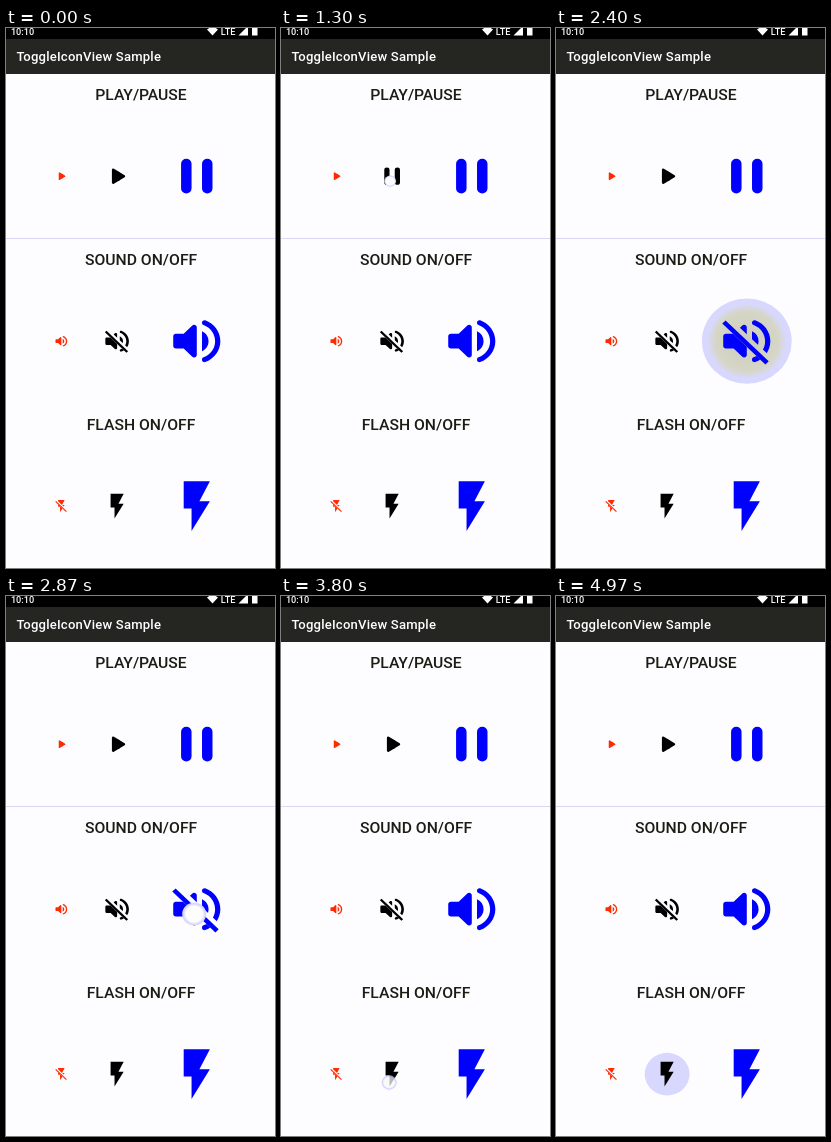
These frames come from a looping animation (269 px wide and 540 px high, 5.03 s). An HTML page with a canvas:

```html
<!DOCTYPE html>
<html>
<head>
<meta charset="utf-8">
<title>ToggleIconView Sample</title>
<style>
html, body { margin: 0; width: 100%; height: 100%; overflow: hidden; background: #fdfdff; }
canvas { display: block; }
</style>
</head>
<body>
<canvas id="stage" width="269" height="540"></canvas>
<script>
const ctx = document.getElementById('stage').getContext('2d');
const LOOP = 5030;
// One layout unit (dp) in pixels; the screen is slightly squashed.
const SX = 0.6545, SY = 0.62;
const COLS = [
  { x: 84.6, size: 24, color: '#ff2a00' },
  { x: 169.8, size: 48, color: '#000' },
  { x: 291.5, size: 96, color: '#00f' }
];
const ROWS = [
  { y: 239, label: 'PLAY/PAUSE', draw: drawPlay, on: [0, 0, 1] },
  { y: 505.1, label: 'SOUND ON/OFF', draw: drawSound, on: [1, 0, 1] },
  { y: 771.2, label: 'FLASH ON/OFF', draw: drawFlash, on: [0, 1, 1] }
];
// dx, dy: touch point relative to the icon centre
const TAPS = [
  { t: 430, row: 0, col: 1, dx: -3, dy: 8 },
  { t: 1300, row: 0, col: 1, dx: -3, dy: 8 },
  { t: 2020, row: 1, col: 2, dx: -4, dy: 8 },
  { t: 2850, row: 1, col: 2, dx: -4, dy: 8 },
  { t: 3730, row: 2, col: 1, dx: -5, dy: 15 },
  { t: 4400, row: 2, col: 1, dx: -5, dy: 15 }
];
const SPEAKER = new Path2D('M3 10v4c0 .55.45 1 1 1h3l3.29 3.29c.63.63 1.71.18 1.71-.71V6.41c0-.89-1.08-1.34-1.71-.71L7 9H4c-.55 0-1 .45-1 1z' +
  'M16.5 12A4.5 4.5 0 0 0 14 7.97v8.05c1.48-.73 2.5-2.25 2.5-4.02z' +
  'M14 4.45v.2c0 .38.25.71.6.85C17.18 6.53 19 9.06 19 12s-1.82 5.47-4.4 6.5c-.36.14-.6.47-.6.85v.2c0 .63.63 1.07 1.21.85C18.6 19.11 21 15.84 21 12s-2.4-7.11-5.79-8.4c-.58-.23-1.21.22-1.21.85z');
const BOLT = new Path2D('M7 2v11h3v9l7-12h-4l4-8z');
const LEFT = [9, 6.8, 13.1, 9.4, 13.1, 14.6, 9, 17.2];
const RIGHT = [13.1, 9.4, 17.2, 12, 17.2, 12, 13.1, 14.6];
const BAR_Y = [7, 7, 17, 17];
const WHITE = [253, 253, 253], LAVENDER = [216, 216, 255];

const clamp = v => Math.max(0, Math.min(1, v));
const lerp = (a, b, p) => a + (b - a) * p;
const ease = p => { p = clamp(p); return p * p * (3 - 2 * p); };
const mix = (a, b, p) => a.map((v, i) => lerp(v, b[i], p));
const rgb = c => `rgb(${c.map(Math.round)})`;

function drawPlay(on) {
  ctx.lineJoin = ctx.lineCap = 'round';
  ctx.lineWidth = lerp(2, 4, on);
  [[LEFT, 8], [RIGHT, 16]].forEach(([quad, barX]) => {
    ctx.beginPath();
    BAR_Y.forEach((y, i) =>
      ctx.lineTo(lerp(quad[2 * i], barX, on), lerp(quad[2 * i + 1], y, on)));
    ctx.closePath();
    ctx.fill();
    ctx.stroke();
  });
}

// Icon crossed out by a growing slash with a gap along its upper side
function drawSlashed(shape, on) {
  const off = 1 - on, len = 16.47 * off, cut = 17.73 * off;
  ctx.save();
  if (off > 0) {
    const gap = new Path2D('M-9-9H33V33H-9z');
    gap.moveTo(2, 4.27);
    gap.lineTo(4.54, 1.73);
    gap.lineTo(4.54 + cut, 1.73 + cut);
    gap.lineTo(2 + cut, 4.27 + cut);
    gap.closePath();
    ctx.clip(gap, 'evenodd');
  }
  ctx.fill(shape);
  ctx.restore();
  if (off > 0) {
    ctx.lineCap = 'butt';
    ctx.lineWidth = 1.8;
    ctx.beginPath();
    ctx.moveTo(3.27, 4.27);
    ctx.lineTo(3.27 + len, 4.27 + len);
    ctx.stroke();
  }
}
function drawSound(on) { drawSlashed(SPEAKER, on); }
function drawFlash(on) { drawSlashed(BOLT, on); }

function iconState(row, col, t) {
  let on = ROWS[row].on[col];
  for (const tap of TAPS) {
    if (tap.row !== row || tap.col !== col) continue;
    on = lerp(on, 1 - on, ease((t - tap.t - 90) / 250));
  }
  return on;
}

function drawRipple(tap, t, over) {
  const age = t - tap.t;
  if (age < 0 || age > 800) return;
  const alpha = over ? clamp(1.4 * (1 - age / 150)) : clamp((800 - age) / 200);
  if (!alpha) return;
  const { x, size } = COLS[tap.col], y = ROWS[tap.row].y;
  const grow = ease(age / 360);
  const r = size * 0.715 * lerp(0.26, 1, grow);
  const tint = c => rgb(mix(mix(WHITE, c, clamp((age - 60) / 140)), LAVENDER, clamp((age - 450) / 100)));
  ctx.save();
  ctx.globalAlpha = alpha;
  ctx.translate(x + tap.dx * (1 - grow), y + tap.dy * (1 - grow));
  const fill = ctx.createRadialGradient(0, 0, 0, 0, 0, r);
  fill.addColorStop(0, tint([204, 204, 190]));
  fill.addColorStop(0.7, tint([214, 214, 198]));
  fill.addColorStop(0.88, rgb(LAVENDER));
  fill.addColorStop(1, rgb(LAVENDER));
  ctx.fillStyle = fill;
  ctx.beginPath();
  ctx.arc(0, 0, r, 0, 7);
  ctx.fill();
  ctx.restore();
}

function text(str, x, y, font, color, align) {
  ctx.font = font + ' Roboto, sans-serif';
  ctx.fillStyle = color;
  ctx.textAlign = align || 'left';
  ctx.fillText(str, x, y);
}

function drawBars() {
  ctx.fillStyle = '#252522';
  ctx.fillRect(0, 0, 269, 46);
  ctx.fillStyle = '#000';
  ctx.fillRect(0, 0, 269, 11);
  ctx.fillStyle = '#d9d9f6';
  ctx.fillRect(0, 210, 269, 1);
  ctx.fillStyle = '#fff';
  ctx.fill(new Path2D('M201 1.5Q206.5-3 212 1.5L206.5 7.5z'));
  ctx.fill(new Path2D('M232.5 7.5L242-2V7.5z'));
  ctx.fillRect(246, 0, 5.5, 7.5);
}

function drawLabels() {
  text('10:10', 7.5, 11.5, '500 14px', '#fff');
  text('LTE', 328, 11.5, '500 14px', '#fff');
  ctx.letterSpacing = '0.3px';
  text('ToggleIconView Sample', 16, 54, '500 20px', '#fff');
  ctx.letterSpacing = '0px';
  for (const { y, label } of ROWS)
    text(label, 206.3, y - 123, '500 24px', '#1c1c14', 'center');
}

function render(t) {
  ctx.setTransform(1, 0, 0, 1, 0, 0);
  ctx.fillStyle = '#fdfdff';
  ctx.fillRect(0, 0, 269, 540);
  drawBars();
  ctx.scale(SX, SY);
  drawLabels();
  TAPS.forEach(tap => drawRipple(tap, t, false));
  ROWS.forEach((row, r) => COLS.forEach((col, c) => {
    ctx.save();
    ctx.translate(col.x, row.y);
    ctx.scale(col.size / 24, col.size / 24);
    ctx.translate(-12, -12);
    ctx.fillStyle = ctx.strokeStyle = col.color;
    row.draw(iconState(r, c, t));
    ctx.restore();
  }));
  TAPS.forEach(tap => drawRipple(tap, t, true));
}

function loop() {
  render(performance.now() % LOOP);
  requestAnimationFrame(loop);
}
loop();
</script>
</body>
</html>
```
